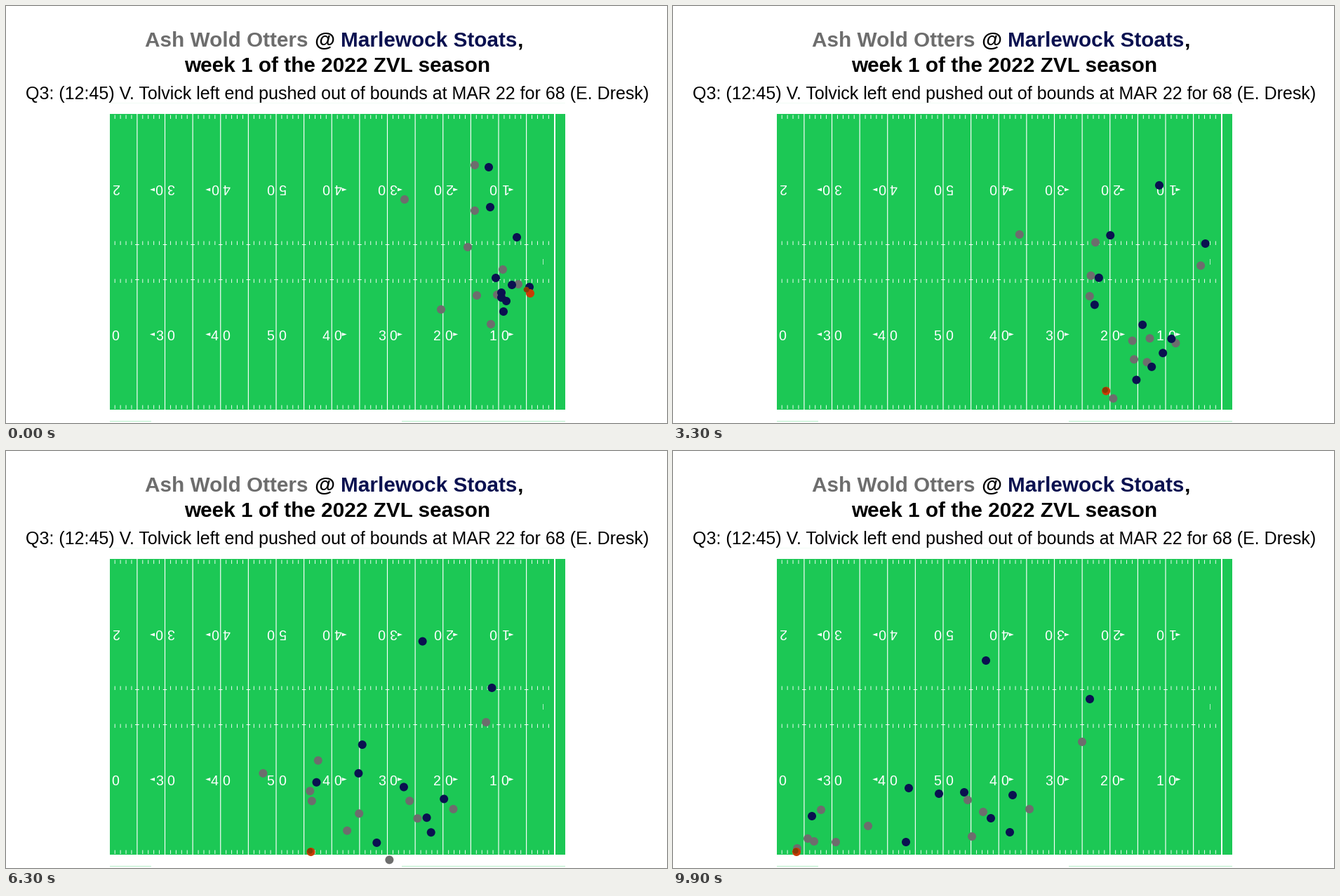
Write a matplotlib script that moves like this. It is 942 px wide and 595 px high and loops after 10000 ms.

```python
import matplotlib.pyplot as plt
import numpy as np
from matplotlib.animation import FuncAnimation

W, H, DPI = 942, 595, 64
PT = 72 / DPI  # points per pixel
FRAMES, STEP = 100, 100
TURN, END = 1.7, 9.9  # seconds: the play opens up, the last frame

GREEN, GREY, NAVY = "#1cc855", "#6d6d6d", "#0a1150"
ORANGE, BROWN = "#c83c05", "#8a3a06"

MID, YARD = 385, 7.925  # x of the midfield line, pixels per yard
LEFT, RIGHT, TOP, BOTTOM = 148, 797, 154, 576
GOAL = 782

# Each player: x, y at the start, at the turn and at the end.
# Players of a group share a bow: how far the run swings off its direct way.
groups = [
    ((0, -26), [(746, 401, 778, 364, 594, 354), (728, 330, 722, 270, 446, 299)],
     [(708, 376, 772, 384, 583, 415), (568, 276, 531, 264, 177, 567)]),
    ((0, 0), [(688, 230, 657, 268, 336, 481)],
     [(668, 227, 648, 270, 211, 512), (668, 292, 643, 320, 192, 553),
      (658, 344, 640, 359, 201, 557)]),
    ((0, 14), [(690, 287, 655, 320, 198, 521), (706, 409, 699, 426, 415, 487)],
     [(700, 412, 699, 439, 278, 535), (691, 454, 707, 467, 232, 558)]),
    ((0, 28), [(713, 421, 727, 451, 453, 524), (709, 436, 699, 491, 332, 558)],
     [(706, 412, 710, 432, 420, 498)]),
    ((22, 31), [(721, 398, 716, 432, 484, 491), (706, 416, 685, 467, 480, 544)],
     [(730, 397, 720, 433, 508, 511), (671, 413, 682, 469, 442, 515)]),
    ((-42, -10), [(698, 388, 667, 414, 379, 489)], []),
    ((0, 76), [], [(620, 433, 651, 474, 426, 550)]),
]
carrier = (747, 410, 692, 478, 176, 575)
SIDELINE = 572

t = np.arange(FRAMES) * STEP / 1000
opening = np.clip(t / TURN, 0, 1)
s = np.clip((t - TURN) / (END - TURN), 0, 1)
along = s * (0.33 + 1.17 * s - 0.5 * s**2)  # speeds up, eases at the end
across = 1 - (1 - s) ** 1.5
swing = 6.75 * s * (1 - s) ** 2


def run(player, bow):
    """Path of one player as an array of x, y per frame."""
    x0, y0, x1, y1, x2, y2 = player
    x = x0 + (x1 - x0) * opening * (1.4 - 0.4 * opening) + (x2 - x1) * along
    y = y0 + (y1 - y0) * opening + (y2 - y1) * across
    return np.column_stack([x + bow[0] * swing, y + bow[1] * swing])


fig = plt.figure(figsize=(W / DPI, H / DPI), dpi=DPI, facecolor="white")
ax = fig.add_axes([0, 0, 1, 1])
ax.set(xlim=(0, W), ylim=(H, 0))
ax.axis("off")


def box(x0, y0, x1, y1, color, z=1):
    ax.add_patch(plt.Rectangle((x0, y0), x1 - x0, y1 - y0, fc=color, lw=0, zorder=z))


def label(x, y, text, size, color="black", **kw):
    kw = {"ha": "center", "va": "baseline", **kw}
    return ax.text(x, y, text, fontsize=size * PT, color=color,
                   family="Liberation Sans", **kw)


def centred_run(cx, y, size, parts):
    """Draw (text, colour, gap before) parts as one bold centred line."""
    x, items = 0, []
    for text, color, gap in parts:
        item = label(0, y, text, size, color, ha="left", weight="bold")
        x += gap * size
        items.append((item, x))
        x += item.get_window_extent().width
    for item, left in items:
        item.set_x(cx - x / 2 + left)


def draw_field():
    box(LEFT, TOP, RIGHT, BOTTOM, GREEN)
    box(LEFT, 138, RIGHT, 139, "#f1fbf5", 0)
    for x0, x1 in ((LEFT, 207), (564, RIGHT)):
        box(x0, 592, x1, 593, "#b4efc8")

    fives = MID + 5 * YARD * np.arange(-5, 10)
    yards = np.arange(-29, 50)
    ticks = MID + YARD * yards[yards % 5 != 0]
    white = dict(color="white", zorder=2, snap=False)
    ax.vlines(fives, TOP, BOTTOM, lw=1.15 * PT, **white)
    ax.vlines(GOAL, TOP, BOTTOM, lw=2 * PT, **white)
    for y in (155.5, 335.5, 389.5, 569.5):
        ax.vlines(ticks, y, y + 5.5, lw=0.9 * PT, **white)
    for y in (340.5, 390.5):
        ax.hlines([y] * len(fives), fives - 2.8, fives + 2.8, lw=PT, **white)
    ax.vlines(765.5, 361, 369, lw=0.8 * PT, alpha=0.8, **white)


def draw_numbers():
    for k in range(-3, 5):
        x = MID + 10 * YARD * k
        tens = str(5 - abs(k))
        for dx, low, high in ((-8.3, tens, "0"), (8.3, "0", tens)):
            if x + dx > LEFT:
                label(x + dx, 477, low, 19.5, "white", zorder=3)
                label(x + dx, 254.5, high, 19.5, "white", rotation=180,
                      rotation_mode="anchor", zorder=3)
        if k and x > LEFT:
            d = np.sign(k)
            for y in (468.5, 262):
                tri = [(x + 14.5 * d, y - 2.4), (x + 14.5 * d, y + 2.4), (x + 21.5 * d, y)]
                ax.add_patch(plt.Polygon(tri, fc="white", lw=0, zorder=3))


draw_field()
draw_numbers()
centred_run(468, 57.5, 29.7, [
    ("Ash Wold Otters", GREY, 0), ("@", "black", 0.278),
    ("Marlewock Stoats", NAVY, 0.278), (",", "black", 0.04)])
label(472, 93.5, "week 1 of the 2022 ZVL season", 29.8, weight="bold")
label(472, 133, "Q3: (12:45) V. Tolvick left end pushed out of bounds "
      "at MAR 22 for 68 (E. Dresk)", 25)

defence = [run(p, bow) for bow, _, greys in groups for p in greys]
offence = [run(p, bow) for bow, blues, _ in groups for p in blues]
runner = run(carrier, (-24, 52))
runner[:, 1] = np.minimum(runner[:, 1], SIDELINE)
ball = runner - (1.3 + 4 * np.exp(-3 * t))[:, None]  # tucked in after the hand-off

tracks = np.array(defence + offence + [runner, ball])
colors = [GREY] * len(defence) + [NAVY] * len(offence) + [ORANGE, BROWN]
sizes = [(12 * PT) ** 2] * (len(tracks) - 1) + [(8 * PT) ** 2]

dots = ax.scatter(*tracks[:, 0].T, s=sizes, c=colors, linewidths=0, zorder=5, snap=False)
box(0, 593, W, H, "white", 6)


def update(i):
    dots.set_offsets(tracks[:, i])
    return (dots,)


anim = FuncAnimation(fig, update, frames=FRAMES, interval=STEP, repeat=True, repeat_delay=0)
plt.show()
```
